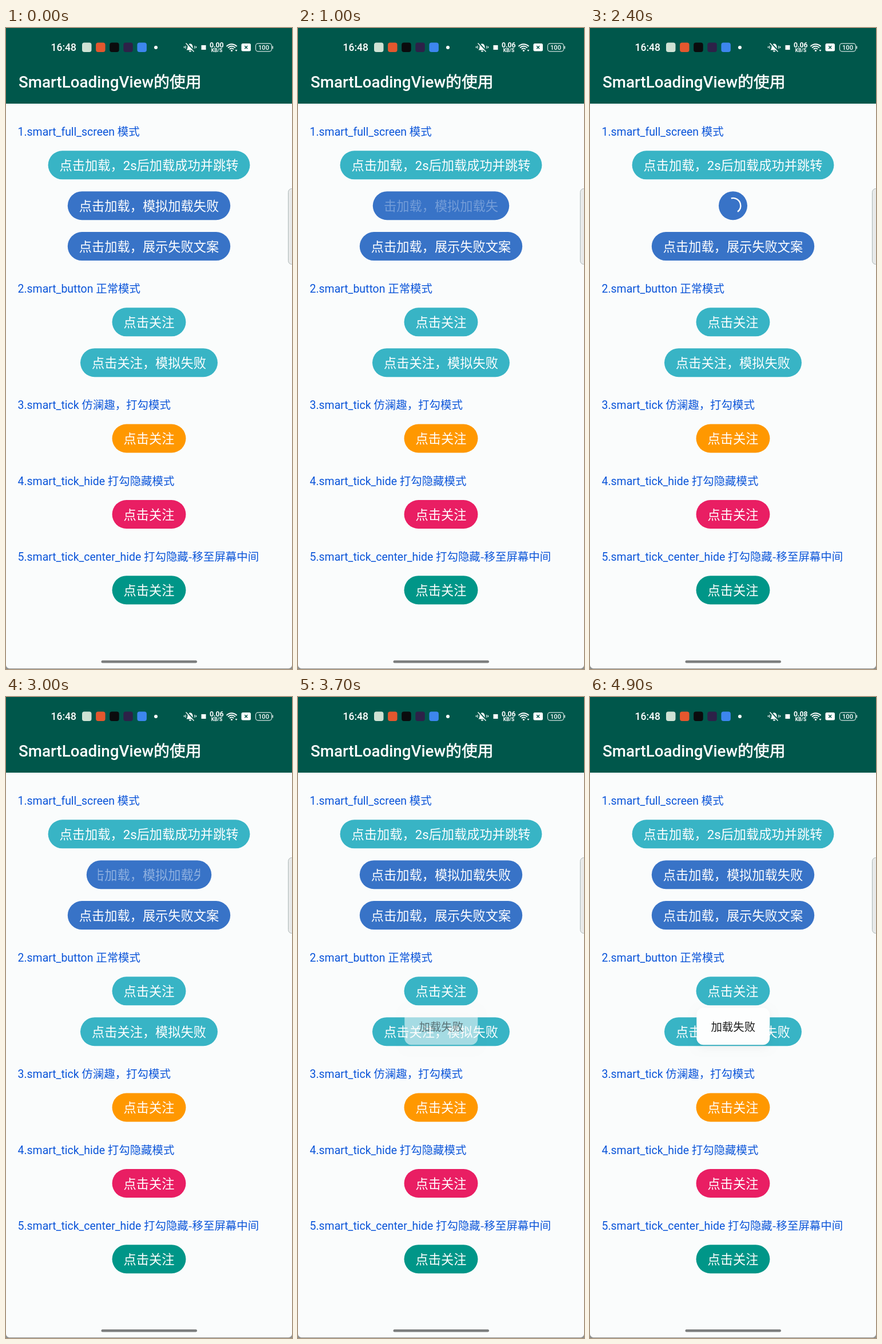
An HTML page with a canvas that plays this animation: 500x1119 px, repeating every 5000 ms.

```html
<!DOCTYPE html>
<html lang="zh-CN">
<head>
<meta charset="utf-8">
<title>SmartLoadingView</title>
<style>
html, body { margin: 0; width: 100%; height: 100%; overflow: hidden; background: #fafcfc; }
canvas { display: block; width: 500px; height: 1119px; }
</style>
</head>
<body>
<canvas id="stage"></canvas>
<script>
const W = 500, H = 1119, LOOP = 5000, STEP = 100;
const HAN = '"Noto Sans CJK SC", "Noto Sans CJK", sans-serif';
const FONT = 'Roboto, ' + HAN;
const TEAL = '#38b4c5', BLUE = '#3873c7', HEAD = '#00574b', PAGE = '#fafcfc';
const canvas = document.getElementById('stage');
const ctx = canvas.getContext('2d');
const dpr = window.devicePixelRatio || 1;
canvas.width = W * dpr;
canvas.height = H * dpr;

const headings = [
  ['1.smart_full_screen ', '模式', 188],
  ['2.smart_button ', '正常模式', 462],
  ['3.smart_tick ', '仿澜趣，打勾模式', 665],
  ['4.smart_tick_hide ', '打勾隐藏模式', 797.5],
  ['5.smart_tick_center_hide ', '打勾隐藏-移至屏幕中间', 930]
];

// label, top, colour
const buttons = [
  ['点击加载，2s后加载成功并跳转', 214.3, TEAL],
  ['点击加载，展示失败文案', 356.1, BLUE],
  ['点击关注', 488.3, TEAL],
  ['点击关注，模拟失败', 559.2, TEAL],
  ['点击关注', 691.5, '#ff9800'],
  ['点击关注', 824, '#e91e63'],
  ['点击关注', 956.2, '#009688']
];
const loader = ['点击加载，模拟加载失败', 285.2, BLUE];

const MID = 250, SIZE = 50, PAD = 20, LABEL = 22.22, BODY = 19.44;
const MORPH = 500, SHRINK = 854, GROW = 2678;
const clamp = v => Math.min(1, Math.max(0, v));
const ease = v => (1 - Math.cos(Math.PI * clamp(v))) / 2;

// Returns the x where the text ends.
function text(s, x, y, size, color, weight = 400, align = 'left', family = FONT) {
  ctx.font = `${weight} ${size}px ${family}`;
  ctx.textAlign = align;
  ctx.fillStyle = color;
  ctx.fillText(s, x, y);
  return x + ctx.measureText(s).width;
}

function box(x, y, w, h, r, fill, stroke, line = 1) {
  ctx.beginPath();
  ctx.roundRect(x, y, w, h, r);
  if (fill) { ctx.fillStyle = fill; ctx.fill(); }
  if (stroke) { ctx.strokeStyle = stroke; ctx.lineWidth = line; ctx.stroke(); }
}

function arc(x, y, r, from, to, line) {
  const rad = Math.PI / 180;
  ctx.beginPath();
  ctx.arc(x, y, r, from * rad, to * rad);
  ctx.strokeStyle = '#fff';
  ctx.lineWidth = line;
  ctx.stroke();
}

function path(points, line, color = '#fff') {
  ctx.beginPath();
  points.forEach(([x, y], i) => i ? ctx.lineTo(x, y) : ctx.moveTo(x, y));
  ctx.strokeStyle = color;
  ctx.lineWidth = line;
  ctx.stroke();
}

function bell() {
  ctx.beginPath();
  ctx.moveTo(315.5, 38.5);
  ctx.quadraticCurveTo(317.5, 37, 317.5, 33);
  ctx.bezierCurveTo(317.5, 25.5, 326.5, 25.5, 326.5, 33);
  ctx.quadraticCurveTo(326.5, 37, 328.5, 38.5);
  ctx.closePath();
  ctx.fillStyle = '#fff';
  ctx.fill();
  box(320, 39.5, 4, 2, 1, '#fff');
  path([[315.5, 26], [329.5, 41]], 3, HEAD);
  path([[314.5, 26.5], [328.5, 41.5]], 1.4);
  path([[314, 31], [314, 36]], 1.2);
  path([[311.5, 32], [311.5, 35]], 1.2);
  path([[330, 31], [330, 36]], 1.2);
  path([[332.5, 32], [332.5, 35]], 1.2);
}

function wifi() {
  [5, 8.7, 12.3].forEach(r => arc(394.5, 40.5, r, -137, -43, 1.9));
  ctx.fillStyle = '#fff';
  ctx.beginPath();
  ctx.arc(394.5, 39.5, 1.6, 0, 7);
  ctx.fill();
  ctx.beginPath();
  ctx.moveTo(400.5, 38);
  ctx.lineTo(404.5, 38);
  ctx.lineTo(402.5, 41);
  ctx.fill();
}

function statusBar(t) {
  text('16:48', 78.5, 40, 17.5, '#fff', 500);
  ['#cfe2d4', '#e4572e', '#0b0b0d', '#2d2148', '#3d86ee'].forEach((c, i) =>
    box(133 + i * 24.1, 25.5, 16.5, 16.5, 4, c));
  ctx.fillStyle = '#fff';
  ctx.beginPath();
  ctx.arc(262, 34, 3, 0, 7);
  ctx.fill();
  bell();
  box(341.5, 30, 8, 8, 0, '#fff');
  const speed = t < 700 ? '0.00' : t < 4000 ? '0.06' : '0.08';
  text(speed, 368.3, 34, 12.3, '#fff', 700, 'center');
  text('KB/S', 368.5, 42, 8.6, '#fff', 700, 'center');
  wifi();
  box(411.5, 27, 16.5, 13.5, 2.5, '#fff');
  path([[417.3, 31.3], [422.2, 36.2]], 1.5, HEAD);
  path([[422.2, 31.3], [417.3, 36.2]], 1.5, HEAD);
  box(436.5, 27.2, 28, 13.6, 4, null, '#d5e3e1', 1.2);
  box(465.5, 31.5, 1.6, 5, 1, '#d5e3e1');
  text('100', 450.5, 38, 11.2, '#fff', 500, 'center');
}

function title() {
  const x = text('SmartLoadingView', 22, 104, 27.78, '#fff', 500);
  text('的使用', x, 104, 27.78, '#fff', 500, 'left', HAN);
  // thicken the regular face to a medium weight
  ctx.strokeStyle = '#fff';
  ctx.lineWidth = 0.6;
  ctx.strokeText('的使用', x, 104);
}

function heading([name, note, y]) {
  const x = text(name, 20.5, y, BODY, '#0b55d9');
  text(note, x, y, BODY, '#0b55d9', 400, 'left', HAN);
}

function fullWidth(label) {
  ctx.font = `400 ${LABEL}px ${FONT}`;
  return ctx.measureText(label).width + 2 * PAD;
}

function pill(width, top, color) {
  box(MID - width / 2, top, width, SIZE, SIZE / 2, color);
}

function caption(label, top) {
  text(label, MID, top + 33.7, LABEL, '#fff', 400, 'center');
}

function button([label, top, color]) {
  pill(fullWidth(label), top, color);
  caption(label, top);
}

function spinner(t) {
  const age = t - 1320, period = 800;
  const turn = Math.floor(age / period);
  const x = age / period - turn;
  const sweep = 300 * (1 - (1 - x) ** 2);
  const base = 54 + age * 0.36 - 60 * Math.floor(turn / 2);
  const from = turn % 2 ? base + sweep : base;
  arc(MID, 310.2, 13.3, from, from + (turn % 2 ? 330 - sweep : 30 + sweep), 2.4);
}

function loadingButton(t) {
  const growing = t >= GROW;
  const k = growing ? 1 - ease((t - GROW) / MORPH) : ease((t - SHRINK) / MORPH);
  if (k === 0) return button(loader);
  const [label, top, color] = loader;
  const full = fullWidth(label);
  const width = full + (SIZE - full) * k;
  pill(width, top, color);
  if (k === 1) return spinner(t);
  const alpha = growing ? 1 - 2 * k : 0.5 - k;
  if (alpha <= 0) return;
  ctx.save();
  ctx.beginPath();
  ctx.rect(MID - width / 2 + PAD, top, width - 2 * PAD, SIZE);
  ctx.clip();
  ctx.globalAlpha = alpha;
  caption(label, top);
  ctx.restore();
}

function toast(t) {
  const alpha = clamp((t - 3450) / 450);
  if (!alpha) return;
  ctx.save();
  ctx.globalAlpha = alpha;
  ctx.shadowColor = `rgba(0,0,0,${0.05 * alpha})`;
  ctx.shadowBlur = 14 * dpr;
  ctx.shadowOffsetY = 5 * dpr;
  box(186.3, 542.5, 128, 64.8, 12, '#fdfefe');
  ctx.shadowColor = 'transparent';
  text('加载失败', 250.3, 583, BODY, '#1c1c1c', 400, 'center');
  ctx.restore();
}

function screenEdge() {
  ctx.beginPath();
  ctx.rect(0, H - 20, W, 20);
  ctx.roundRect(0, H - 20, W, 19, [0, 0, 6, 6]);
  ctx.fillStyle = '#8b8e8e';
  ctx.fill('evenodd');
}

function draw(t) {
  ctx.setTransform(dpr, 0, 0, dpr, 0, 0);
  ctx.fillStyle = PAGE;
  ctx.fillRect(0, 0, W, H);
  const shade = ctx.createLinearGradient(0, 132, 0, 135);
  shade.addColorStop(0, '#e0e5e4');
  shade.addColorStop(1, PAGE);
  ctx.fillStyle = shade;
  ctx.fillRect(0, 132, W, 3);
  ctx.fillStyle = HEAD;
  ctx.fillRect(0, 0, W, 132);
  statusBar(t);
  title();
  headings.forEach(heading);
  buttons.forEach(button);
  loadingButton(t);
  toast(t);
  box(493.5, 280.5, 20, 132, 6, '#e8eaea', '#adb8b8');
  box(166.5, 1104, 167.5, 4.4, 2.2, '#7d7f7f');
  screenEdge();
}

function frame(now) {
  draw(Math.floor((now % LOOP) / STEP) * STEP);
  requestAnimationFrame(frame);
}
requestAnimationFrame(frame);
</script>
</body>
</html>
```
